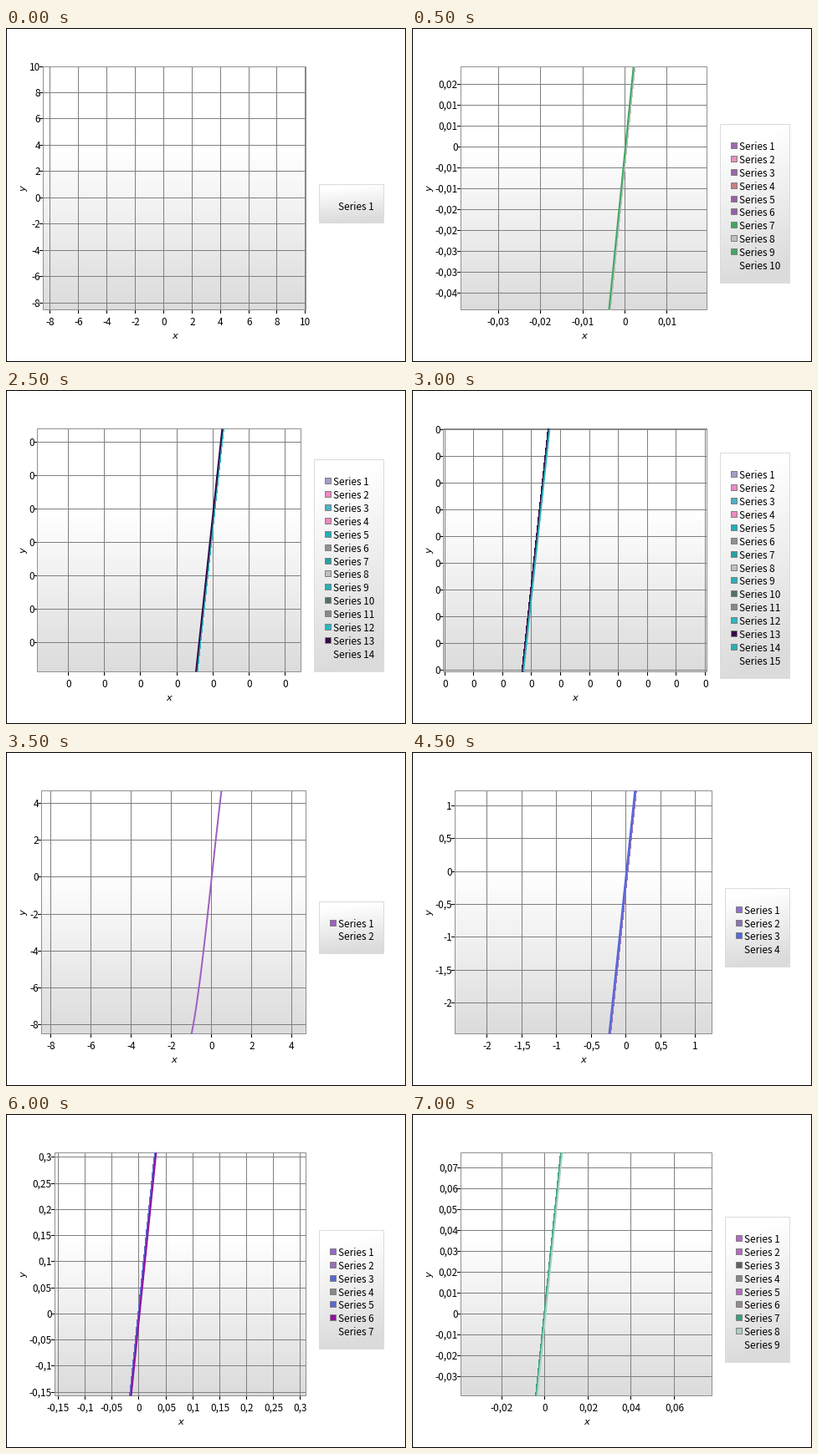
Recreate the animation shown at these times as a matplotlib script. Size 478 px wide and 400 px high, loop 7.5 s.

```python
import math

import numpy as np
import matplotlib.pyplot as plt
from matplotlib.animation import FuncAnimation
from matplotlib.patches import Rectangle

W, H, DPI = 478, 400, 100
PT = 72 / DPI
FRAMES, STEP_MS = 15, 500
TOP, BOTTOM = 46.5, 337.5
GRAY = "#808080"

# Series colours, keyed by the largest series count they serve
PALETTES = {
    2: ["#a060c0"],
    4: ["#9070d0", "#9070b8", "#5068e0"],
    7: ["#9068c8", "#9870b8", "#5868d0", "#888888", "#5868d0", "#9010a0"],
    9: ["#b868c8", "#b868c8", "#606060", "#888888", "#b868c8", "#988898",
        "#38a078", "#a8d0c0"],
    12: ["#a06ab0", "#e88fbf", "#9866a8", "#c88080", "#9560a8", "#9560a8",
         "#3fa860", "#bfbfbf", "#3fa860", "#50b050", "#cc8080"],
    15: ["#a0a0c8", "#f088c8", "#50b0c8", "#f088c0", "#20b0b8", "#909090",
         "#28a0a0", "#c0c0c0", "#28b0b8", "#507068", "#888888", "#28b8c0",
         "#380848", "#28b0b8"],
}

plt.rcParams["font.family"] = ["Noto Sans CJK JP", "DejaVu Sans"]
fig = plt.figure(figsize=(W / DPI, H / DPI), dpi=DPI, facecolor="white")
ax = fig.add_axes([0, 0, 1, 1])


def series_count(frame):
    if frame == 0:
        return 1
    return frame + 9 if frame < 7 else frame - 5


def bound(n):
    """End of the bracket replaced at step n; signs alternate."""
    first = {0: 10, 1: -10 * math.sin(1), 2: 4.70}
    return first.get(n, (-1) ** n * 10 * math.sin(1.98 / 2 ** n))


def ticks(lo, hi, most):
    span = hi - lo
    steps = (m * 10.0 ** e for e in range(-5, 2) for m in (1, 2, 5))
    step = next(s for s in steps if span / s <= most)
    first = math.ceil(lo / step - 1e-9)
    last = math.floor(hi / step + 1e-9)
    return [i * step for i in range(first, last + 1)]


def label(v):
    cents = math.floor(abs(v) * 100 + 0.5 + 1e-6)
    if not cents:
        return "0"
    text = f"{cents / 100:.2f}".rstrip("0").rstrip(".").replace(".", ",")
    return "-" + text if v < 0 else text


def label_width(s):
    return sum({"-": 4.8, ",": 2.6}.get(c, 6.47) for c in s)


def line(xs, ys, color, width=1.0, z=2, smooth=True):
    ax.plot(xs, ys, color=color, lw=width * PT, zorder=z, snap=False,
            antialiased=smooth, solid_capstyle="butt")


def box(x0, y0, x1, y1, edge, face="none", z=3):
    ax.add_patch(Rectangle((x0, y0), x1 - x0, y1 - y0, fc=face, ec=edge,
                           lw=PT, zorder=z, snap=False))


def text(x, y, s, ha="left", size=11.8):
    ax.text(x, y, s, ha=ha, va="baseline", fontsize=size * PT, zorder=6)


def axis_name(x, y, s, turn=0):
    ax.text(x, y, s, ha="center", va="center", rotation=turn, style="italic",
            family="DejaVu Sans", fontsize=11.5 * PT, zorder=6)


def gradient(x0, y0, x1, y1, shade):
    v, u = np.mgrid[0:1:200j, 0:1:80j]
    t = np.clip(shade(u, v), 0, 1)
    ax.imshow(1 - t * 36 / 255, cmap="gray", vmin=0, vmax=1, zorder=1,
              extent=(x0, x1, y1, y0), aspect="auto",
              interpolation="bilinear")


def plot_shade(u, v):
    return (v - 0.33) / 0.67


def legend_shade(u, v):
    du, dv = 0.116, 0.87
    return ((u - 0.442) * du + (v - 0.065) * dv) / (du * du + dv * dv)


def draw_plot(n, colors):
    lo, hi = sorted((bound(n - 1), bound(n)))
    xt, yt = ticks(lo, hi, 10.5), ticks(lo, hi, 12)
    left = round(31 + max(label_width(label(v)) for v in yt)) + 0.5
    right = 358.5 if n < 10 else 352.5

    def px(v):
        return left + 1 + (v - lo) / (hi - lo) * (right - left - 1.6)

    def py(v):
        return BOTTOM - 1.5 - (v - lo) / (hi - lo) * (BOTTOM - TOP - 1)

    gradient(left, TOP, right, BOTTOM, plot_shade)
    for v in xt:
        x = math.floor(px(v)) + 0.5
        line([x, x], [TOP, BOTTOM], GRAY)
        line([x, x], [BOTTOM, BOTTOM + 4.5], "black")
        text(x, 355.6, label(v), "center")
    for v in yt:
        y = math.floor(py(v)) + 0.5
        line([left, right], [y, y], GRAY)
        line([left - 4.5, left], [y, y], "black")
        text(left - 3.5, y + 4.5, label(v), "right")
    box(left, TOP, right, BOTTOM, "#909090")
    axis_name((left + right) / 2, 368.5, "x")
    axis_name(21.5, 193, "y", 90)

    if n > 1:
        ys = np.linspace(lo, hi, 80)
        xs = px(np.arcsin(ys / 10)) + 0.5
        rows = BOTTOM - (ys - lo) / (hi - lo) * (BOTTOM - TOP)
        if n > 2:
            side = 0.9 if n % 2 == 0 else -0.9
            line(xs + side, rows, colors[n - 3], 2, 4, smooth=False)
        line(xs, rows, colors[n - 2], 2, 5)


def draw_legend(n, colors):
    left, right = (374.5 if n < 10 else 368.5), 451.5
    half = (30 + 15.95 * n) / 2
    y0, y1 = round(210 - half) + 0.5, round(210 + half) + 0.5
    gradient(left, y0, right, y1, legend_shade)
    box(left, y0, right, y1, "#dbdbdb")
    for i in range(n):
        y = round(213.5 + (i - (n - 1) / 2) * 15.92)
        text(left + 23, y + 4, f"Series {i + 1}")
        if i < n - 1:
            box(left + 13, y - 4.5, left + 20, y + 2.5, GRAY, colors[i])


def update(frame):
    ax.clear()
    n = series_count(frame)
    colors = PALETTES[min(k for k in PALETTES if k >= n)]
    draw_plot(n, colors)
    draw_legend(n, colors)
    box(0.5, 0.5, W - 0.5, H - 0.5, "black")
    ax.set_xlim(0, W)
    ax.set_ylim(H, 0)
    ax.axis("off")
    return []


anim = FuncAnimation(fig, update, frames=FRAMES, interval=STEP_MS,
                     init_func=lambda: [], repeat=True, repeat_delay=0)
plt.show()
```
